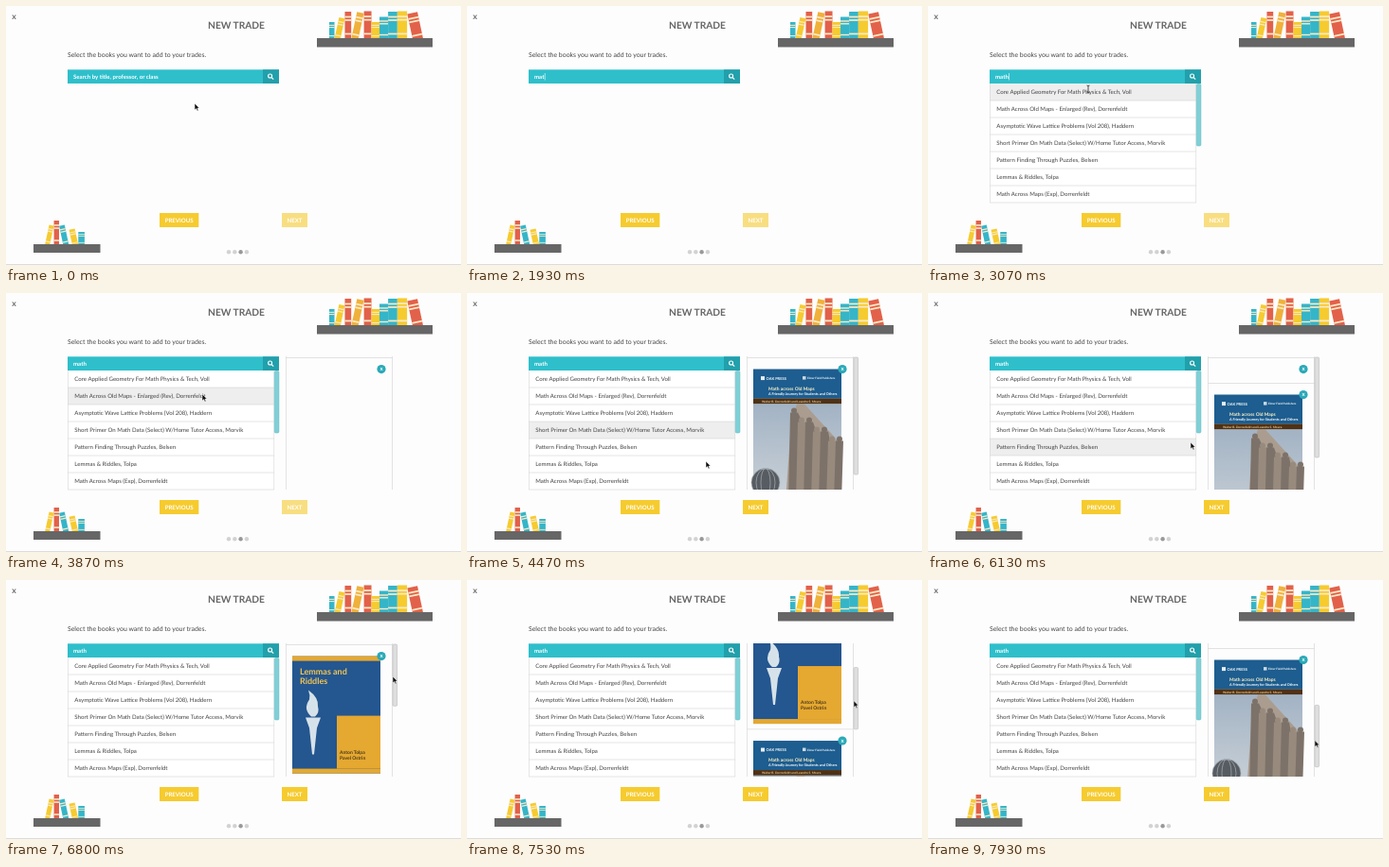
Animation of 480x274 px, one loop 8000 ms. Source, as an HTML page:

```html
<!DOCTYPE html>
<html lang="en">
<head>
<meta charset="utf-8">
<title>New trade</title>
<style>
  html, body { margin: 0; width: 100%; height: 100%; overflow: hidden; background: #fdfdfd; }
  svg { display: block; width: 480px; height: 274px; }
  text { font-family: Lato, "Open Sans", sans-serif; fill: #444; text-rendering: geometricPrecision; white-space: pre; }
  .title { font-size: 10.2px; font-weight: 700; fill: #666; }
  .lead { font-size: 6.9px; }
  .row { font-size: 6.1px; }
  .bold { font-size: 6.1px; font-weight: 700; fill: #fff; }
</style>
</head>
<body>
<svg id="stage" viewBox="0 0 480 274" xmlns="http://www.w3.org/2000/svg"></svg>
<script>
const LOOP = 8000, STEP = 200 / 3;
const TEAL = '#2ebfcb', YELLOW = '#f6cb2f', GOLD = '#e5a830', LINE = '#ddd';
const LIST_TOP = 82, ROW = 18, VIEW_TOP = 68, VIEW = 140;

const rows = [
  'Core Applied Geometry For Math Physics & Tech, Voll',
  'Math Across Old Maps - Enlarged (Rev), Dorrenfeldt',
  'Asymptotic Wave Lattice Problems (Vol 208), Haddern',
  'Short Primer On Math Data (Select) W/Home Tutor Access, Morvik',
  'Pattern Finding Through Puzzles, Belsen',
  'Lemmas & Riddles, Tolpa',
  'Math Across Maps (Exp), Dorrenfeldt'
];

const $ = id => document.getElementById(id);
const rect = (x, y, w, h, fill, more = '') =>
  `<rect x="${x}" y="${y}" width="${w}" height="${h}" fill="${fill}" ${more}/>`;
const circle = (x, y, r, fill) => `<circle cx="${x}" cy="${y}" r="${r}" fill="${fill}"/>`;
const shape = (d, fill) => `<path d="${d}" fill="${fill}"/>`;
const text = (x, y, s, cls, more = '') =>
  `<text x="${x}" y="${y}" class="${cls}" ${more}>${s.replace(/&/g, '&amp;')}</text>`;
const centered = (x, y, s, cls) => text(x, y, s, cls, 'text-anchor="middle"');
const small = (x, y, s, size, fill = '#fff') =>
  text(x, y, s, 'bold', `style="font-size:${size}px;fill:${fill}"`);

// Books stand side by side: a letter is a colour, / and \ make the next one lean.
function books(x, y, plan, width, height) {
  const colours = { t: '#35b5c8', y: YELLOW, r: '#e2614a', o: '#f0b13a' };
  return plan.split(' ').map((code, i) => {
    const w = width(i), h = height(i);
    const tilt = { '/': 12, '\\': -12 }[code[0]] || 0;
    const reach = h * Math.sin(Math.abs(tilt) * Math.PI / 180);
    const foot = x + (tilt < 0 ? reach : 0);
    x += w + reach;
    return `<g transform="translate(${foot} ${y}) rotate(${tilt} ${tilt < 0 ? w : 0} 0)">` +
      rect(0, -h, w, h, colours[code.slice(-1)]) +
      [.84, .72, .22].map(k => rect(0, -h * k, w, h * .06, '#fbe9c6')).join('') + '</g>';
  }).join('');
}

const shelves =
  books(341, 35, 't /y r /o r y t t y \\r', i => 5.5 + .6 * i, i => Math.min(29.5, 18 + 5.5 * (i % 5))) +
  rect(328, 34, 122, 9.5, '#666') +
  books(41, 253, '/y r \\t \\y t', i => 5 + .4 * i, i => 26 - 4 * Math.abs(i - 1)) +
  rect(29, 252, 70.5, 9, '#666');

// A row of stone figures, each lower and nearer than the one before.
const figures = Array.from({ length: 7 }, (_, i) => {
  const x = 40 + i * 8, y = 46 + i * 5 + (i % 2) * 5;
  const tone = ['#7d7269', '#988b7e'][i % 2];
  return circle(x + 3, y - 2, 3, tone) + shape(`M${x - 3} 140L${x - 1} ${y}H${x + 7}L93 140Z`, tone);
}).join('');

const mapsCover =
  rect(0, 0, 93, 140, 'url(#sky)') + shape('M34 140L40 56L46 37H54L93 80V140Z', '#aa9d90') + figures +
  circle(13, 120, 15, '#565c62') +
  [5, 10, 15].map(r => `<ellipse cx="13" cy="120" rx="${r}" ry="15" fill="none" stroke="#a9b0b5" stroke-width=".7"/>`).join('') +
  rect(0, 0, 93, 31, '#1d5d8f') + rect(0, 31, 93, 5.5, '#4f3115') +
  rect(8, 7.5, 4, 4, '#e8eef4') + small(13.5, 11, 'OAK PRESS', 4) +
  rect(52, 7.5, 3.5, 3.5, '#c9d9e6') + small(57, 10.6, 'Elmer Field Publishers', 3) +
  small(16, 22, 'Math across Old Maps', 4.9, '#fff3c8') +
  small(16, 27, 'A Friendly Journey for Students and Others', 3.8) +
  small(9, 35, 'Walter B. Dorrenfeldt and Leandro S. Moura', 3.2, '#e9c98e');

const riddlesCover =
  rect(0, 0, 93, 124, '#24568f') + rect(0, 0, 93, 5, GOLD) + rect(0, 119, 93, 5, GOLD) +
  small(8, 19, 'Lemmas and', 9, '#f3c553') + small(8, 29, 'Riddles', 9, '#f3c553') +
  rect(47, 63, 46, 56, GOLD) +
  shape('M20 64Q11 56 18 46Q19 41 17 36Q28 44 27 53Q29 60 24 64ZM14 65H30L26 76L23 104H21L18 76Z', '#d6e2ea') +
  small(50, 103, 'Anton Tolpa', 5, '#4b3a1a') + small(50, 109, 'Pavel Ostrin', 5, '#4b3a1a');

const card = (id, cover) => `<g id="${id}">${rect(295, 0, 113, .8, LINE)}` +
  `<g id="${id}Cover" transform="translate(302 12.6)">${cover}</g>` +
  circle(396, 12.6, 4.6, '#2aa9b8') + centered(396, 14.4, 'x', 'bold') + '</g>';

const list = rect(65, LIST_TOP, 218, 126, '#fff') + rect(65, LIST_TOP, 218, ROW, '#eee', 'id="hover"') +
  rows.map((name, i) => text(72.3, LIST_TOP + 11.3 + ROW * i, name, 'row') +
    rect(65, LIST_TOP + ROW * (i + 1) - .3, 218, .6, '#d5d5d5')).join('') +
  [65, 282.5].map(x => rect(x, LIST_TOP, .6, 126, '#d5d5d5')).join('') +
  rect(283.3, 82.5, 4.6, 65.5, '#7fd0d7', 'rx="1.2" stroke="#58b6bf" stroke-width=".5"');

const button = (x, w, label) => rect(x, 219, w, 15, YELLOW) + centered(x + w / 2, 228.8, label, 'bold');

$('stage').innerHTML =
  `<defs><clipPath id="view">${rect(290, 67, 125, 141)}</clipPath>
   <linearGradient id="sky" x2="0" y2="1"><stop offset=".2" stop-color="#9fb0c2"/><stop offset="1" stop-color="#ccd3d9"/></linearGradient></defs>` +
  rect(0, 0, 480, 274, '#fdfdfd') + rect(0, 273, 480, 1, '#dcdcdc') + shelves +
  text(6.3, 14, 'x', 'lead', 'style="font-size:9px"') +
  centered(243, 23.6, 'NEW TRADE', 'title') +
  text(65, 54.2, 'Select the books you want to add to your trades.', 'lead') +
  rect(65, 67.3, 223, 14.7, TEAL) + rect(271, 67.3, 17, 14.7, '#22a0ab') +
  `<g fill="none" stroke="#fff" stroke-width="1.1"><circle cx="278.6" cy="74" r="2"/><path d="M280.1 75.5L282.2 77.6"/></g>` +
  text(71, 76.8, '', 'bold', 'id="query"') + rect(0, 71, .6, 7.5, '#fff', 'id="caret"') +
  `<g id="list">${list}</g>` +
  `<g id="panel" clip-path="url(#view)">` + [295, 407].map(x => rect(x, 67, .8, 141, LINE)).join('') +
  card('maps', mapsCover) + card('riddles', riddlesCover) +
  rect(408, 0, 4.6, 0, '#dedede', 'id="thumb" rx="1.2" stroke="#bbb" stroke-width=".6"') + '</g>' +
  button(162, 41.3, 'PREVIOUS') + `<g id="next">${button(291, 27, 'NEXT')}</g>` +
  [0, 1, 2, 3].map(i => circle(235 + 6.3 * i, 260.2, 2.2, i == 2 ? '#999' : '#d2d2d2')).join('') +
  `<path id="arrow" d="M0 0V7L1.7 5.5L2.8 8L4 7.4L2.9 5.1H5Z" fill="#111" stroke="#fff" stroke-width=".5"/>` +
  `<path id="beam" d="M-1.5 -4Q0 -4 0 -3Q0 -4 1.5 -4M0 -3V3M-1.5 4Q0 4 0 3Q0 4 1.5 4" fill="none" stroke="#222" stroke-width=".8"/>`;

// Pointer moves: start, end, x, y
const moves = [
  [67, 333, 114, 75], [2400, 2800, 169, 88], [3100, 3600, 207, 107], [4000, 4467, 252, 178],
  [4733, 5333, 220, 174], [5867, 6133, 277, 158], [6133, 6667, 408, 102]
];

const clamp = (v, lo = 0, hi = 1) => Math.min(hi, Math.max(lo, v));
const ease = p => p * p * (3 - 2 * p);
const scrollAt = t => 138 * clamp((t - 7133) / 800) ** 1.4;

function pointer(t) {
  let x = 199, y = 103;
  for (const [from, to, toX, toY] of moves) {
    const p = ease(clamp((t - from) / (to - from)));
    x += (toX - x) * p;
    y += (toY - y) * p;
  }
  return { x, y: y + scrollAt(t) * .49 };
}

// The highlight trails the pointer a little.
function hoveredRow(t) {
  const { x, y } = pointer(t - 200);
  return x < 283 ? Math.floor((y - LIST_TOP) / ROW) : -1;
}

function caretOn(t) {
  if (t < 467 || t > 3590) return false;
  const rest = t < 2000 ? Math.min(t, 1400) - 467 : t - 2000;
  return rest % 933 < 530;
}

const show = (id, on) => $(id).setAttribute('visibility', on ? 'inherit' : 'hidden');
const move = (id, x, y) => $(id).setAttribute('transform', `translate(${x} ${y})`);

function draw(now) {
  const t = Math.floor((now % LOOP + 5) / STEP) * STEP + 1;

  const typed = 'math'.slice(0, clamp(Math.floor((t - 1633) / 100), 0, 4));
  $('query').textContent = typed || 'Search by title, professor, or class';
  $('caret').setAttribute('x', 71.4 + (typed ? $('query').getComputedTextLength() : 0));
  show('caret', caretOn(t));

  const open = t > 2133, row = hoveredRow(t);
  show('list', open);
  show('hover', open && row >= 0);
  $('hover').setAttribute('y', LIST_TOP + ROW * row);

  const mapsLoaded = t > 4133, added = t > 5867, riddlesLoaded = t > 6400;
  const offset = added ? (riddlesLoaded ? 142 : 27) : 0;
  const ratio = VIEW / (158 + offset), scroll = scrollAt(t);
  show('panel', t > 3800);
  show('mapsCover', mapsLoaded);
  show('riddles', added);
  show('riddlesCover', riddlesLoaded);
  move('maps', 0, VIEW_TOP + offset - scroll);
  move('riddles', 0, VIEW_TOP - scroll);
  show('thumb', mapsLoaded);
  $('thumb').setAttribute('y', VIEW_TOP + scroll * ratio);
  $('thumb').setAttribute('height', VIEW * ratio);
  $('next').setAttribute('opacity', t > 3930 ? 1 : .6);

  const { x, y } = pointer(t), away = t > 1067 && t < 2933;
  const beam = t > 250 && t < 3133;
  show('beam', beam && !away);
  show('arrow', !beam);
  move('beam', x, y);
  move('arrow', x, y);
}

const start = performance.now();
function tick() {
  draw(performance.now() - start);
  requestAnimationFrame(tick);
}
draw(0);
requestAnimationFrame(tick);
</script>
</body>
</html>
```
